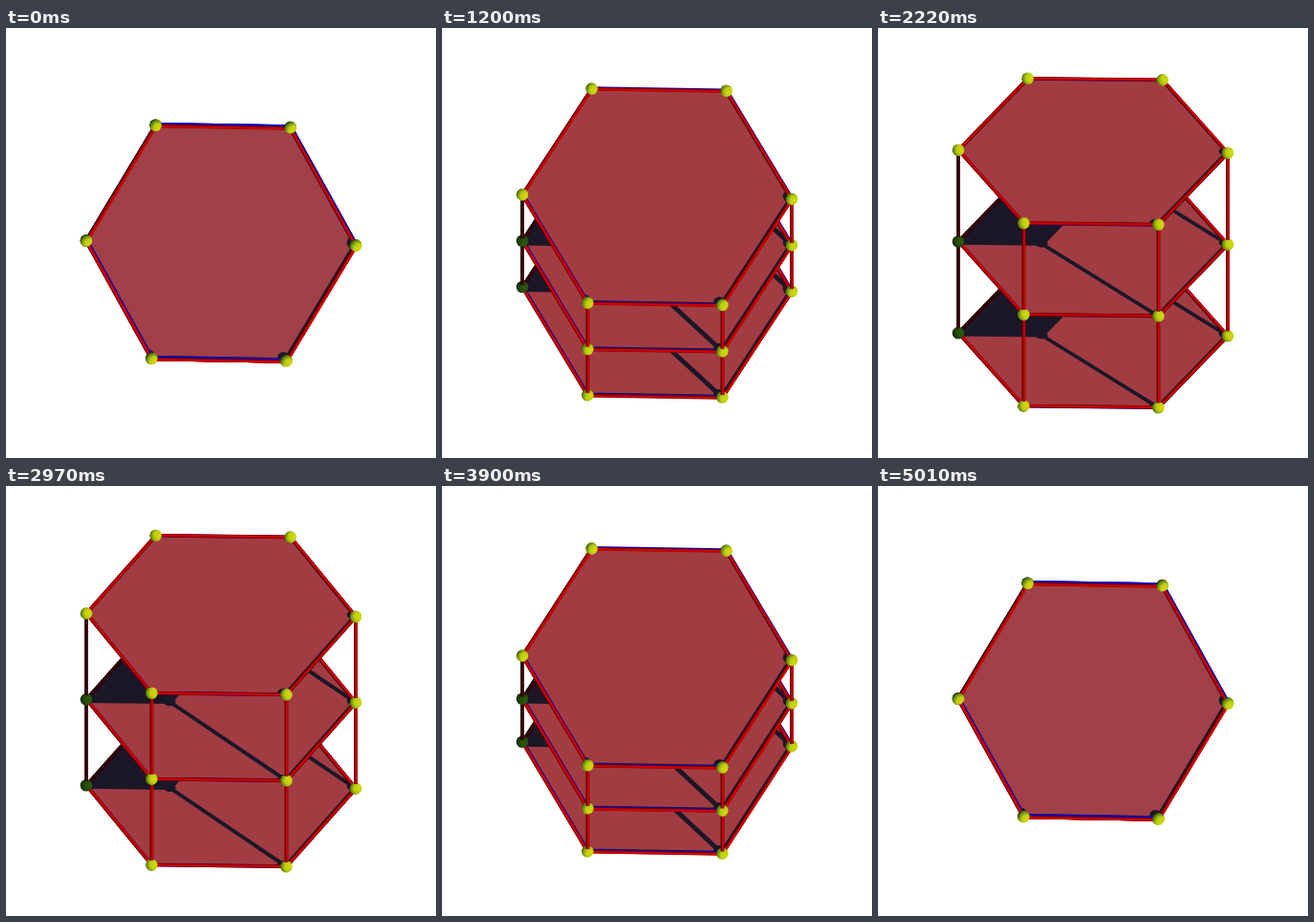
Recreate the animation shown at these times as an HTML page with a canvas. Size 450 by 450 pixels, loop 5.04 s.

```html
<!DOCTYPE html>
<html>
<head>
<meta charset="utf-8">
<style>
html, body { margin: 0; height: 100%; overflow: hidden; background: #fff; }
canvas { display: block; }
</style>
</head>
<body>
<canvas id="stage" width="450" height="450"></canvas>
<script>
const ctx = document.getElementById('stage').getContext('2d');
const RAD = Math.PI / 180, R = 141, GAP = 122, BALL = 6.3, SHADOW = '#1b1727';
const hex = [0, 1, 2, 3, 4, 5].map(k => {
  const a = (k * 60 + 1) * RAD;
  return [R * Math.cos(a), R * Math.sin(a)];
});
let c, s, flat;

const project = ([x, y], z) => [225 + x, 225 + y * c - z * GAP * s];

function line(a, b, width, color, dx = 0, dy = 0) {
  ctx.beginPath();
  ctx.moveTo(a[0] + dx, a[1] + dy);
  ctx.lineTo(b[0] + dx, b[1] + dy);
  ctx.lineWidth = width;
  ctx.strokeStyle = color;
  ctx.stroke();
}

// A rod with its bright side turned to the light
function rod(a, b, dark, bright, width = 3.8) {
  line(a, b, width, dark);
  const len = Math.hypot(b[0] - a[0], b[1] - a[1]);
  if (len < 1) return;
  const px = (a[1] - b[1]) / len, py = (b[0] - a[0]) / len;
  const k = 1.1 * (px * 0.577 + py * 0.577 * (c - s));
  line(a, b, width - 1.4, bright, px * k, py * k);
}

function ball([x, y], shaded) {
  const gx = x + 3.4, gy = y + 3.4 * (c - s);
  const g = ctx.createRadialGradient(gx, gy, 0, gx, gy, 11.2);
  const stops = shaded
    ? ['#2c5a08', '#264c08', '#183206', '#0a1604']
    : ['#d2da0c', '#bccc10', '#6c8812', '#163808'];
  stops.forEach((color, i) => g.addColorStop([0, 0.45, 0.75, 1][i], color));
  ctx.fillStyle = g;
  ctx.beginPath();
  ctx.arc(x, y, BALL, 0, 7);
  ctx.fill();
}

function hexPath(d = 0) {
  ctx.beginPath();
  hex.forEach(([x, y]) => ctx.lineTo(x + d, y + d));
  ctx.closePath();
}

// Shadow of rods and balls, thrown to the upper left within the plane
function frameShadow(rodShift, ballShift, width) {
  hexPath(rodShift);
  ctx.lineWidth = width;
  ctx.stroke();
  for (const [x, y] of hex) {
    ctx.beginPath();
    ctx.arc(x + ballShift, y + ballShift, BALL, 0, 7);
    ctx.fill();
  }
}

function face(z) {
  ctx.save();
  ctx.transform(1, 0, 0, c, 225, 225 - z * GAP * s);
  hexPath();
  ctx.fillStyle = `rgb(${162 - 2 * flat},${60 + 4 * flat},${67 + 5 * flat})`;
  ctx.fill();
  ctx.clip();
  ctx.fillStyle = ctx.strokeStyle = SHADOW;
  frameShadow(-1, -3, 4);
  if (z < 1) {
    hexPath(-GAP);
    ctx.fill();
    frameShadow(-GAP, -GAP, 6);
    for (const p of hex) line(p, [p[0] - GAP, p[1] - GAP], 5, SHADOW);
  }
  ctx.restore();
}

function layer(z) {
  face(z);
  const pts = hex.map(p => project(p, z)), lift = c - s;
  pts.forEach((a, k) => {
    const b = pts[(k + 1) % 6], shaded = z < 1 && k === 3;
    line(a, b, 3.4, k % 3 ? '#0800c0' : '#0c0a26', 0.4, -1.1 * lift);
    ctx.save();
    ctx.translate(0, 0.7 * lift);
    rod(a, b, shaded ? '#180004' : '#780000', shaded ? '#3c0004' : '#cc0000', 3.6);
    ctx.restore();
  });
  pts.forEach((p, k) => ball(p, z < 1 && k === 3));
}

// Posts leave each ball at its top, in front of it when tilted
function posts(z) {
  for (let k = 0; k < 4; k++) {
    const shaded = k === 3;
    rod(project(hex[k], z + BALL / GAP), project(hex[k], z + 1),
      shaded ? '#140000' : '#600000', shaded ? '#480000' : '#c40000');
  }
}

function draw(now) {
  const step = Math.floor(now % 5040 / 30);
  const tilt = Math.max(0, 60 - Math.abs(84 - step) * 5 / 6);
  c = Math.cos(tilt * RAD);
  s = Math.sin(tilt * RAD);
  flat = Math.max(0, 1 - tilt / 10);
  ctx.fillStyle = '#fff';
  ctx.fillRect(0, 0, 450, 450);
  for (const z of [-1, 0, 1]) {
    layer(z);
    if (z < 1) posts(z);
  }
}

let start;
function tick(now) {
  start ??= now;
  draw(now - start);
  requestAnimationFrame(tick);
}
draw(0);
requestAnimationFrame(tick);
</script>
</body>
</html>
```
